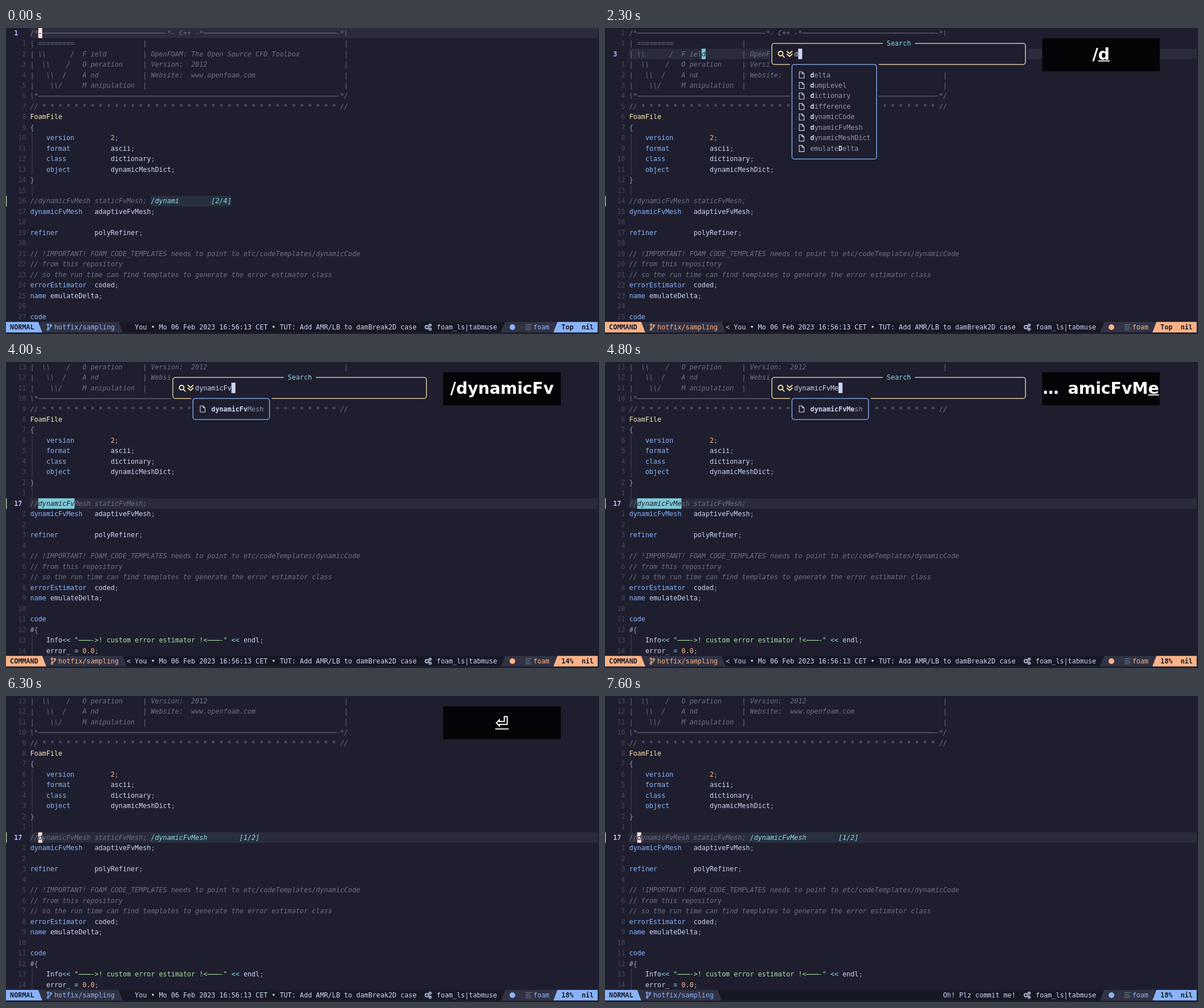
Animation of 1041 by 538 pixels, one loop 8 s. Source, as an HTML page with a canvas:

```html
<!DOCTYPE html>
<html lang="en">
<head>
<meta charset="utf-8">
<title>Editor search</title>
<style>
html, body { margin: 0; width: 100%; height: 100%; overflow: hidden; background: #1e1e2e; }
canvas { display: block; }
</style>
</head>
<body>
<canvas id="stage" width="1041" height="538"></canvas>
<script>
const g = document.getElementById('stage').getContext('2d');
const W = 7.066, H = 18.48, EDGE = 1038.7, ROWS = 28, GUTTER = 6, LOOP = 8000;
const C = {
  base: '#1e1e2e', mantle: '#181825', band: '#2a2b3c', section: '#313244', faint: '#45475a',
  comment: '#6c7086', dim: '#9399b2', text: '#cdd6f4', blue: '#89b4fa', yellow: '#f9e2af',
  peach: '#fab387', green: '#a6e3a1', sky: '#89dceb', match: '#7ec9d8', lens: '#28303f',
  number: '#b4befe', cursor: '#f5e0dc', icon: '#6d8086'
};

const boxLine = s => s.padEnd(28) + '|';
const LINES = [
  '/*' + '-'.repeat(32) + '*- C++ -*' + '-'.repeat(34) + '*\\',
  boxLine('| ========='),
  boxLine('| \\\\      /  F ield') + ' OpenFOAM: The Open Source CFD Toolbox',
  boxLine('|  \\\\    /   O peration') + ' Version:  2012',
  boxLine('|   \\\\  /    A nd') + ' Website:  www.openfoam.com',
  boxLine('|    \\\\/     M anipulation'),
  '\\*' + '-'.repeat(75) + '*/',
  '//' + ' *'.repeat(37) + ' //',
  'FoamFile',
  '{',
  '    version         2;',
  '    format          ascii;',
  '    class           dictionary;',
  '    object          dynamicMeshDict;',
  '}',
  '',
  '//dynamicFvMesh staticFvMesh;',
  'dynamicFvMesh   adaptiveFvMesh;',
  '',
  'refiner         polyRefiner;',
  '',
  '// !IMPORTANT! FOAM_CODE_TEMPLATES needs to point to etc/codeTemplates/dynamicCode',
  '// from this repository',
  '// so the run time can find templates to generate the error estimator class',
  'errorEstimator  coded;',
  'name emulateDelta;',
  '',
  'code',
  '#{',
  '    Info<< "---->! custom error estimator !<----" << endl;',
  '    error_ = 0.0;'
].map((s, i) => i > 0 && i < 6 ? s.padEnd(78) + '|' : s);
const GUIDED = [10, 11, 12, 13, 15, 29, 30];
const KEYWORD = /^(version|format|class|object|dynamicFvMesh|refiner|errorEstimator|name|code)$/;
const WORDS = ['delta', 'dumpLevel', 'dictionary', 'difference', 'dynamicCode',
  'dynamicFvMesh', 'dynamicMeshDict', 'emulateDelta'];

const QUERY = 'dynamicFvMesh';
// at: time typed, n: letters so far, fresh: underlined keys, until: underline end, lag: menu delay
const KEYS = [
  { at: 1200, n: 0, fresh: 1, until: 1400 },
  { at: 2300, n: 1, fresh: 1 },
  { at: 2500, n: 2, fresh: 1 },
  { at: 2900, n: 6, fresh: 4 },
  { at: 3100, n: 7, fresh: 1, until: 3400, lag: 100 },
  { at: 3600, n: 8, fresh: 1 },
  { at: 3800, n: 9, fresh: 1, until: 4000, lag: 100 },
  { at: 4200, n: 10, fresh: 1, until: 4400 },
  { at: 4800, n: 11, fresh: 1 },
  { at: 5000, n: 12, fresh: 1 },
  { at: 5100, n: 13, fresh: 2, until: 5300 }
];
const ENTER = 6300;

const rowY = row => row * H - .6;

function rect(x, y, w, h, color) {
  g.fillStyle = color;
  g.fillRect(x, y, w, h);
}

function cells(col, row, cols, rows, color) {
  rect(col * W, rowY(row), cols * W, rows * H, color);
}

// Long dash runs join into one stroke, as in a font with ligatures.
function put(s, col, row, color, style = '') {
  const y = rowY(row);
  g.font = `${style} 11.74px "DejaVu Sans Mono", monospace`;
  g.textAlign = 'left';
  g.fillStyle = color;
  s = s.replace(/-{2,}(?=-)/g, (run, i) => {
    g.fillRect((col + i) * W, y + 9, run.length * W + 1, 1.1);
    return ' '.repeat(run.length);
  });
  [...s].forEach((ch, i) => ch !== ' ' && g.fillText(ch, (col + i) * W, y + 13.2));
}

function stroke(d, color, width = 1.2) {
  g.strokeStyle = color;
  g.lineWidth = width;
  g.stroke(new Path2D(d));
}

function poly(color, ...p) {
  g.fillStyle = color;
  g.fill(new Path2D('M' + p.join(' ') + 'Z'));
}

function frame(col, row, cols, rows, color) {
  cells(col, row, cols, rows, C.base);
  g.strokeStyle = color;
  g.lineWidth = 1.3;
  g.beginPath();
  g.roundRect((col + .46) * W, rowY(row + .5), (cols - 1) * W, (rows - 1) * H, 4);
  g.stroke();
}

function tokenColor(s) {
  if (s[0] === '"') return C.green;
  if (/^[<=]/.test(s)) return C.sky;
  if (/^\d/.test(s)) return C.peach;
  if (/^[;{}#]/.test(s)) return C.dim;
  if (s === 'FoamFile') return C.yellow;
  return KEYWORD.test(s) ? C.blue : C.text;
}

const isComment = i => i < 8 || LINES[i].startsWith('//');

function drawCode(top, cur) {
  rect(GUTTER * W, rowY(cur - top), EDGE - GUTTER * W, H, C.band);
  for (let row = 0; row < ROWS; row++) {
    const i = top + row, line = LINES[i];
    if (i === cur) put(String(i + 1), 2, row, C.number, 'bold');
    else put(String(Math.abs(i - cur)).padStart(2), 3, row, C.faint);
    if (GUIDED.includes(i)) rect(45.4, rowY(row), 1, H, C.faint);
    if (i === 16) rect(0, rowY(row), 1.3, H, C.green);
    if (isComment(i)) put(line, GUTTER, row, C.comment, 'italic');
    else for (const m of line.matchAll(/".*?"|<<|=|\d[\d.]*|[;{}#]|\w+/g))
      put(m[0], GUTTER + m.index, row, tokenColor(m[0]));
  }
}

function mark(line, at, len, top, color) {
  cells(GUTTER + at, line - top, len, 1, color);
  put(LINES[line].substr(at, len), GUTTER + at, line - top, C.base, isComment(line) ? 'italic' : '');
}

function drawLens(text, row) {
  cells(36, row, text.length, 1, C.lens);
  put(text, 36, row, C.sky, 'italic');
}

function drawPrompt(query) {
  frame(41, 1, 64, 3, C.yellow);
  cells(69, 1, 8, 1, C.base);
  put('Search', 70, 1, C.sky);
  stroke('M312.3 45a4 4 0 1 0-8 0a4 4 0 1 0 8 0M311.2 47.8l4 4', C.yellow, 1.9);
  stroke('M319 40.5l5 4.5l5-4.5M319 45.5l5 4.5l5-4.5', C.yellow, 1.8);
  put(query, 47, 2, C.text);
  cells(47 + query.length, 2, 1, 1, C.text);
}

function drawMenu(query) {
  if (!query) return;
  const find = w => w.toLowerCase().indexOf(query.toLowerCase());
  const items = WORDS.filter(w => find(w) >= 0);
  const widest = Math.max(...items.map(w => w.length));
  frame(46, 3, widest + 7, items.length + 2, C.blue);
  items.forEach((w, i) => {
    const row = 4 + i, at = find(w), end = at + query.length;
    stroke(`M341 ${rowY(row) + 3.7}h5l3.5 3.5v7.5h-8.5zm5 0v3.5h3.5`, C.text, 1.1);
    put(w.slice(0, at), 51, row, C.dim);
    put(w.slice(at, end), 51 + at, row, C.text, 'bold');
    put(w.slice(end), 51 + end, row, C.dim);
  });
}

function drawStatus(mode, place, note) {
  const y = rowY(28), b = rowY(29), m = mode.length;
  const accent = mode === 'NORMAL' ? C.blue : C.peach;
  const left = (col, color) => poly(color, 0, y, col * W, y, (col + 1) * W, b, 0, b);
  const right = (col, color) => poly(color, (col + 1) * W, y, EDGE, y, EDGE, b, col * W, b);
  rect(0, y, EDGE, b - y, C.mantle);
  left(m + 22, C.section);
  left(m + 2, accent);
  right(123, C.section);
  right(136, accent);
  put(mode, 1, 28, C.mantle, 'bold');
  const x = (m + 4) * W + 3;
  stroke(`M${x} 523v6m5-4.5q0 3-5 3.5`, accent, 1.3);
  for (const [dx, cy] of [[0, 521.8], [0, 530.2], [5, 523]]) {
    g.beginPath();
    g.arc(x + dx, cy, 1.5, 0, 7);
    g.stroke();
  }
  put('hotfix/sampling', m + 6, 28, accent);
  if (m === 7) put('<', 30, 28, C.text);
  put(note, 102 - note.length, 28, C.text);
  for (const [cx, cy, r] of [[738.8, 526, 2.6], [744.5, 522.6, 1.5], [744.5, 529.6, 1.5]]) {
    g.strokeStyle = C.text;
    g.lineWidth = 1.2;
    g.beginPath();
    g.arc(cx, cy, r, 0, 7);
    g.stroke();
    g.setLineDash([1, r * .57]);
    g.beginPath();
    g.arc(cx, cy, r + 1, 0, 7);
    g.stroke();
    g.setLineDash([]);
  }
  put('foam_ls|tabmuse', 107, 28, C.text);
  g.fillStyle = accent;
  g.beginPath();
  g.arc(889, 526, 5, 0, 7);
  g.fill();
  stroke('M912 521.5h11M912 524.5h8M912 527.5h11M912 530.5h9', C.icon, 1.2);
  put('foam', 131, 28, accent);
  put(place, 141 - place.length, 28, C.mantle, 'bold');
  put('nil', 143, 28, C.mantle, 'bold');
}

// Key display: centred while it fits, otherwise the last eight keys after an ellipsis.
function drawKeys(keys, fresh) {
  rect(767.5, 18, 206.5, 58, '#050507');
  g.font = 'bold 28.26px "DejaVu Sans", sans-serif';
  g.textAlign = 'left';
  g.fillStyle = '#fff';
  const base = 56.4, long = keys.length > 10;
  if (long) {
    g.fillText('…', 768.5, base);
    keys = keys.slice(-8);
  }
  const w = g.measureText(keys).width;
  const x = long ? 972.6 - w : 870.7 - w / 2;
  g.fillText(keys, x, base);
  if (fresh) {
    const tail = g.measureText(keys.slice(-fresh)).width;
    rect(x + w - tail, 57, tail, 1.8, '#fff');
  }
}

function draw(t) {
  const searching = t >= KEYS[0].at && t < ENTER;
  const top = t < 3600 ? 0 : 3;
  const place = t < 2500 ? 'Top' : t < 3600 ? '3%' : t < 4800 ? '14%' : '18%';
  const note = t < 7400
    ? 'You • Mo 06 Feb 2023 16:56:13 CET • TUT: Add AMR/LB to damBreak2D case'
    : 'Oh! Plz commit me!';
  const [line, at] = t < 2300 ? [0, 2] : t < 2500 ? [2, 18] : t < 3600 ? [13, 20] : [16, 2];

  rect(0, 0, 1041, 538, C.base);
  drawCode(top, line);
  if (searching) {
    const i = KEYS.findLastIndex(k => t >= k.at), key = KEYS[i];
    const query = QUERY.slice(0, key.n);
    const stale = t < key.at + (key.lag || 0);
    if (key.n) mark(line, at, key.n, top, C.match);
    drawPrompt(query);
    drawMenu(stale ? QUERY.slice(0, KEYS[i - 1].n) : query);
    drawKeys('/' + query, t < (key.until || LOOP) ? key.fresh : 0);
  } else {
    mark(line, at, 1, top, C.cursor);
    drawLens(t < ENTER ? '/dynami        [2/4]' : '/dynamicFvMesh        [1/2]', 16 - top);
    if (t >= ENTER && t < 7600) drawKeys('⏎', t < 6600 ? 1 : 0);
  }
  drawStatus(searching ? 'COMMAND' : 'NORMAL', place, note);
}

const start = performance.now();
(function tick() {
  draw((performance.now() - start) % LOOP);
  requestAnimationFrame(tick);
})();
</script>
</body>
</html>
```
